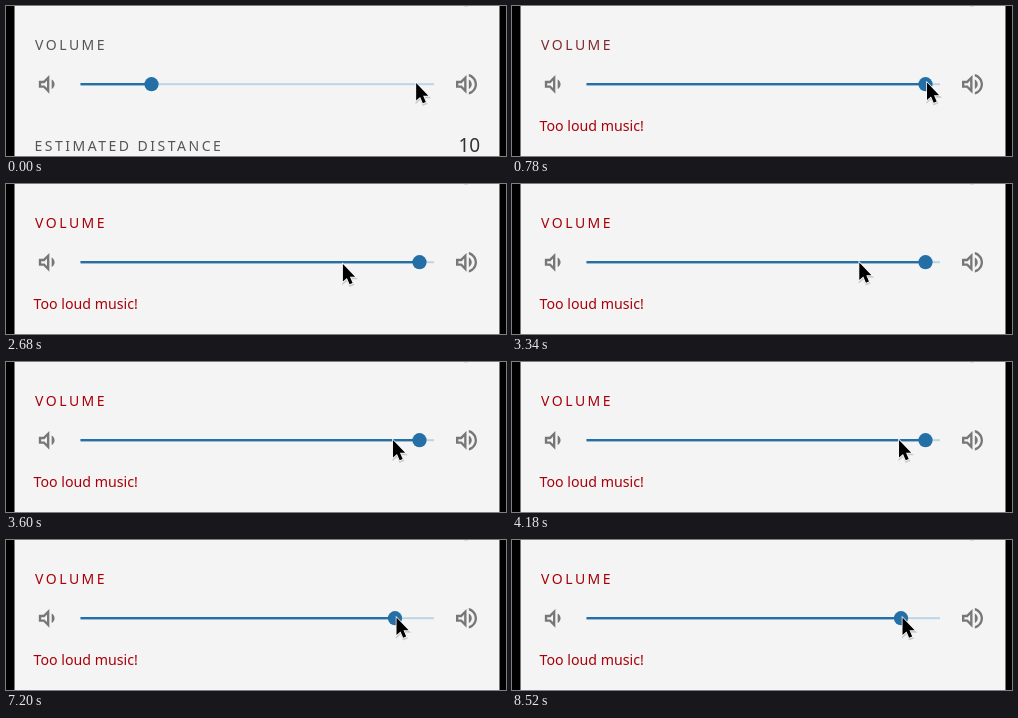
Recreate the animation shown at these times as an HTML page. Size 500 by 150 pixels, loop 8.58 s.

```html
<!DOCTYPE html>
<html lang="en">
<head>
<meta charset="utf-8">
<title>Volume slider</title>
<style>
  html, body { margin: 0; width: 100%; height: 100%; overflow: hidden; background: #000; }
  svg { display: block; width: 500px; height: 150px; }
  text { font-family: "Noto Sans", "Open Sans", sans-serif; }
  .label { font-size: 14px; letter-spacing: 2.5px; fill: #555; }
  .icon { fill: #777; }
</style>
</head>
<body>
<svg viewBox="0 0 500 150">
  <rect width="500" height="150" fill="#000"/>
  <rect x="8.5" width="485" height="150" fill="#f4f4f4"/>
  <rect x="458" width="4" height="1" fill="#ddd"/>

  <text id="title" class="label" x="29" y="44">VOLUME</text>

  <path class="icon" transform="translate(27 64.3) scale(1.167)" d="M16 7.97v8.05c1.48-.73 2.5-2.25 2.5-4.02 0-1.77-1.02-3.29-2.5-4.03zM5 9v6h4l5 5V4L9 9H5zm7-.17v6.34L9.83 13H7v-2h2.83L12 8.83z"/>
  <path class="icon" transform="translate(446.5 64.3) scale(1.167)" d="M3 9v6h4l5 5V4L7 9H3zm7-.17v6.34L7.83 13H5v-2h2.83L10 8.83zM16.5 12c0-1.77-1.02-3.29-2.5-4.03v8.05c1.48-.73 2.5-2.25 2.5-4.02zM14 3.23v2.06c2.89.86 5 3.54 5 6.71s-2.11 5.85-5 6.71v2.06c4.01-.91 7-4.49 7-8.77s-2.99-7.86-7-8.77z"/>

  <rect x="74.5" y="77.2" width="353.5" height="2" fill="#bcd4e6"/>
  <rect id="fill" x="74.5" y="77" width="71" height="2.4" fill="#236fa6"/>
  <circle id="knob" cx="145.5" cy="78.2" r="7.1" fill="#236fa6"/>

  <g id="distance">
    <text class="label" x="28.5" y="144.5">ESTIMATED DISTANCE</text>
    <text x="452.5" y="146" font-size="19" fill="#333">10</text>
  </g>
  <text id="error" x="27.5" y="125" font-size="14.2" fill="#a80008">Too loud music!</text>

  <g id="cursor">
    <path d="M0 0V17.5L4 13.9 6.7 20.3 9.7 19 7 12.8H12.2Z" transform="translate(.4 1.5)" fill="#000" opacity=".16" stroke="#000" stroke-width="2"/>
    <path d="M0 0V17.5L4 13.9 6.7 20.3 9.7 19 7 12.8H12.2Z" fill="#000" stroke="#fff" stroke-width="1.5" paint-order="stroke"/>
  </g>
</svg>
<script>
const LOOP = 8580;
const byId = id => document.getElementById(id);
const [title, fill, knob, distance, error, cursor] =
  ["title", "fill", "knob", "distance", "error", "cursor"].map(byId);

// time, x, y of the pointer tip
const pointerPath = [
  [0, 410, 77], [20, 413, 77], [40, 415, 76.5],
  [2420, 415, 76.5], [2500, 398, 77.5], [2600, 358, 79], [2680, 337, 80], [2760, 330, 80],
  [3220, 330, 80], [3340, 347, 78.5], [3440, 375, 78], [3540, 397, 78], [3680, 374, 78],
  [4080, 374, 78], [4180, 387, 78], [4300, 390.5, 77.5],
  [LOOP, 390.5, 77.5]
];
// time, x of the knob
const knobSteps = [[0, 145.5], [740, 413.5], [6580, 389]];

const mix = (a, b, p) => a + (b - a) * p;
const clamp = v => Math.min(1, Math.max(0, v));

function pointerAt(t) {
  const i = pointerPath.findIndex(step => step[0] > t);
  const [t0, x0, y0] = pointerPath[i - 1];
  const [t1, x1, y1] = pointerPath[i];
  const p = (t - t0) / (t1 - t0);
  return [mix(x0, x1, p), mix(y0, y1, p)];
}

function draw(t) {
  const x = knobSteps.filter(step => step[0] <= t).pop()[1];
  knob.setAttribute("cx", x);
  fill.setAttribute("width", x - 74.5);

  const loud = t >= 740;
  distance.style.display = loud ? "none" : "";
  error.style.display = loud ? "" : "none";
  const p = clamp((t - 720) / 120);
  title.style.fill = `rgb(${mix(85, 168, p)},${mix(85, 0, p)},${mix(85, 8, p)})`;

  cursor.setAttribute("transform", `translate(${pointerAt(t)})`);
}

const start = performance.now();
function tick() {
  draw((performance.now() - start) % LOOP);
  requestAnimationFrame(tick);
}
tick();
</script>
</body>
</html>
```
